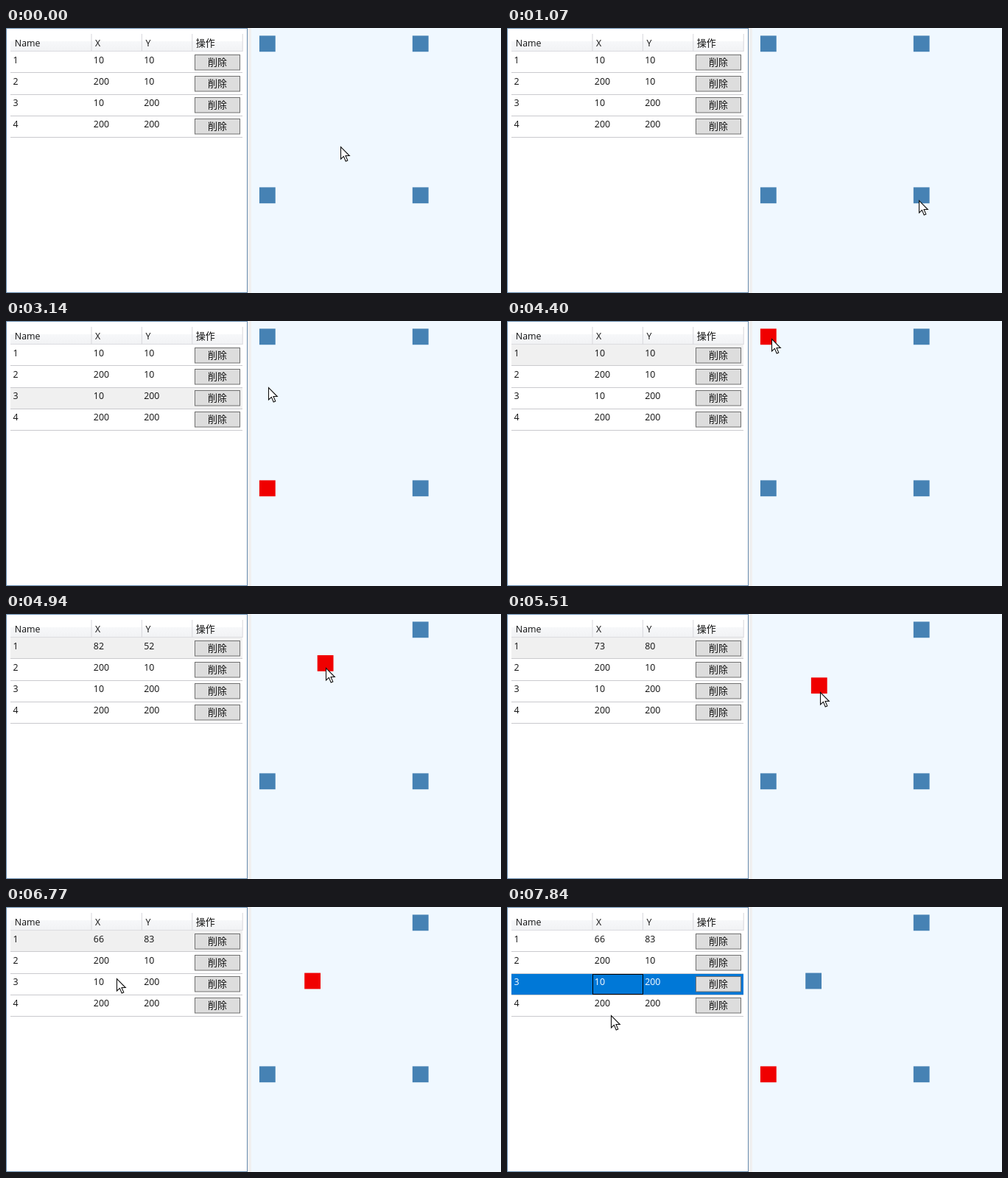
Animation, 672 px wide and 360 px high, one loop 8 s. Source, as an HTML page:

```html
<!DOCTYPE html>
<html lang="ja">
<head>
<meta charset="utf-8">
<style>
  html, body { margin: 0; width: 100%; height: 100%; overflow: hidden; background: #f0f8ff; }
  svg { display: block; font: 12.4px "Open Sans", "Noto Sans", sans-serif; fill: #111; }
  .ja { font: 13px "Noto Sans CJK JP", "Noto Sans CJK", sans-serif; }
</style>
</head>
<body>
<svg id="stage" width="672" height="360" viewBox="0 0 672 360">
  <defs>
    <linearGradient id="head" x2="0" y2="1">
      <stop offset=".4" stop-color="#fff"/>
      <stop offset=".4" stop-color="#f7f8fa"/>
      <stop offset="1" stop-color="#f1f2f4"/>
    </linearGradient>
  </defs>
</svg>
<script>
const LOOP = 8000;
const stage = document.getElementById('stage');

function add(tag, attrs, text) {
  const el = document.createElementNS('http://www.w3.org/2000/svg', tag);
  set(el, attrs);
  if (text) el.textContent = text;
  return stage.appendChild(el);
}
function set(el, attrs) {
  for (const name in attrs) el.setAttribute(name, attrs[name]);
}
const rect = (x, y, width, height, fill, extra) => add('rect', { x, y, width, height, fill, ...extra });
const label = (x, y, text, extra) => add('text', { x, y, ...extra }, text);

// Window, splitter and table header
const columnX = n => 116 + 68.4 * n;
const rowTop = i => 32 + Math.round(29.25 * i);
rect(328, 0, 5, 360, '#f0f0f0');
rect(0.5, 0.5, 327, 359, '#fff', { stroke: '#688caf' });
rect(6, 8, 315, 24, 'url(#head)');
rect(6, 31, 315, 1, '#dcdce0');
for (let n = 0; n < 4; n++) rect(columnX(n) - 0.5, 8, 1, 24, '#d8d8dc');
label(11.8, 24.5, 'Name');
label(columnX(0) + 5, 24.5, 'X');
label(columnX(1) + 5, 24.5, 'Y');
label(columnX(2) + 5, 25, '操作', { class: 'ja' });

// Table rows and their squares
const items = [0, 1, 2, 3].map(i => {
  const pos = [i & 1 ? 200 : 10, i & 2 ? 200 : 10];
  const top = rowTop(i), height = rowTop(i + 1) - top - 1, base = 48 + 29 * i;
  const back = rect(6, top, 315, height, 'none');
  rect(6, top + height, 315, 1, '#cacace');
  const texts = [i + 1, ...pos].map((value, n) => label(n ? columnX(n - 1) + 2.8 : 9.5, base, value));
  const buttonY = Math.round(35.8 + 29.2 * i);
  rect(256.5, buttonY + 0.5, 61, 20.5, '#ddd', { stroke: '#707070' });
  label(287, buttonY + 15.2, '削除', { class: 'ja', 'text-anchor': 'middle' });
  return { pos, back, texts, square: rect(0, 0, 21.8, 21.8) };
});
const focus = rect(116.5, 91.5, 68, 27, 'none', { stroke: '#000' });
const cursor = add('path', {
  d: 'M.5 .5V17L4.4 13.4L7.2 20L9.8 18.9L7 12.5H12.3Z',
  fill: '#fff', stroke: '#111', 'stroke-width': 1.1
});

// Pointer moves: start time, end time, destination
const START = [454, 161];
const moves = [
  [30, 830, 555, 236], [1000, 1070, 559, 234], [1270, 2300, 349, 222], [2670, 3440, 359, 24],
  [4400, 5190, 457, 88], [5190, 5510, 425, 106], [5510, 5750, 400, 144], [5750, 6240, 417, 110],
  [6300, 6770, 150, 97], [6810, 7370, 139, 105], [7450, 7840, 141, 147]
];
const GRAB = 4400, RELEASE = 6240, ROW_CLICK = 7370;

function pointer(t) {
  let [x, y] = START;
  for (const [from, to, toX, toY] of moves) {
    const k = Math.min(1, Math.max(0, (t - from) / (to - from)));
    const ease = k * k * (3 - 2 * k);
    x += (toX - x) * ease;
    y += (toY - y) * ease;
  }
  return [x, y];
}

function draggedPosition(t) {
  const [x, y] = pointer(Math.min(Math.max(t, GRAB), RELEASE));
  return [Math.round(10 + 0.96 * (x - 359)), Math.round(10 + 0.852 * (y - 24))];
}

function selectedItem(t) {
  if (t < 1270) return -1;
  if (t < 2400) return 3;
  return t >= GRAB && t < ROW_CLICK ? 0 : 2;
}

function draw(t) {
  const selected = selectedItem(t), active = t >= ROW_CLICK;
  items[0].pos = draggedPosition(t);
  items.forEach(({ pos, back, texts, square }, i) => {
    const on = i === selected;
    set(back, { fill: !on ? 'none' : active ? '#0078d7' : '#f0f0f0' });
    texts.forEach((el, n) => {
      if (n) el.textContent = pos[n - 1];
      set(el, { fill: on && active ? '#fff' : '#111' });
    });
    set(square, {
      x: 333 + 1.094 * pos[0],
      y: 1.084 * pos[1] - 0.4,
      fill: on ? '#f00000' : '#4682b4'
    });
  });
  set(focus, { visibility: active ? 'visible' : 'hidden' });
  set(cursor, { transform: `translate(${pointer(t).map(Math.round)})` });
}

function tick() {
  draw(performance.now() % LOOP);
  requestAnimationFrame(tick);
}
tick();
</script>
</body>
</html>
```
